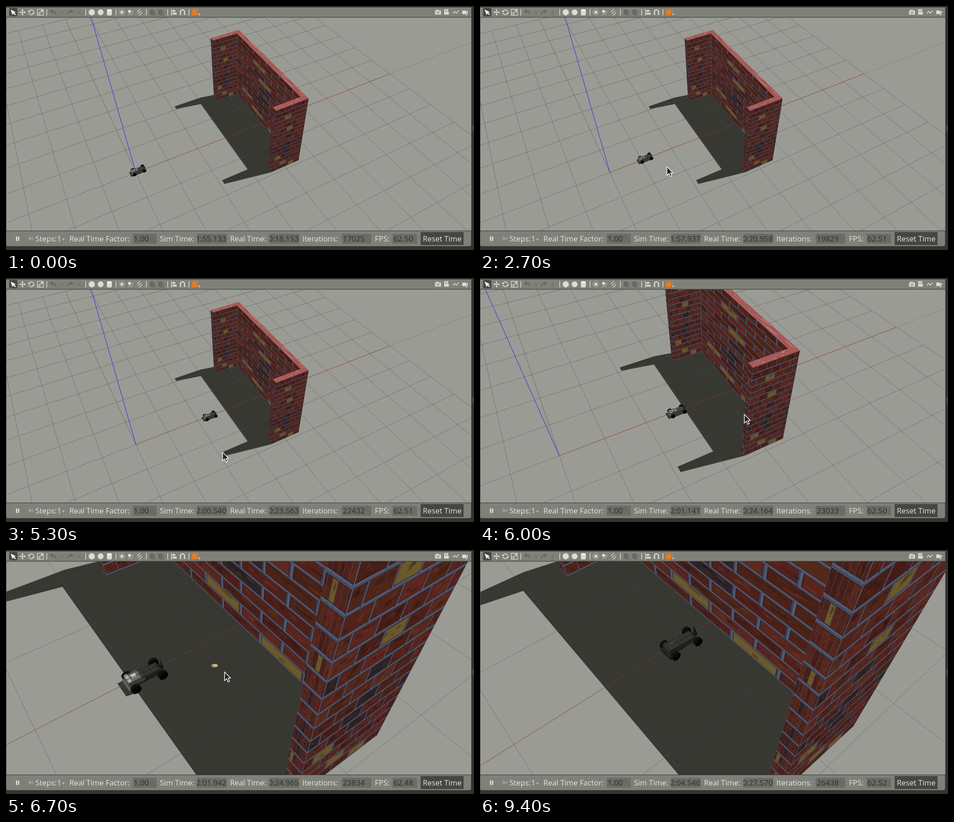
An HTML page with a canvas for the animation above (9500 ms loop, 1034 by 542 pixels).

```html
<!DOCTYPE html>
<html lang="en">
<head>
<meta charset="utf-8">
<title>Robot approaching a wall</title>
<style>
html, body { margin: 0; width: 100%; height: 100%; overflow: hidden; background: #34342f; }
canvas { display: block; }
</style>
</head>
<body>
<canvas id="stage" width="1034" height="542"></canvas>
<script>
const g = document.getElementById('stage').getContext('2d');
const LOOP = 9500, STEP = 100, FOCAL = 890, TURN = Math.PI * 2;

const mix = (a, b, k) => a + (b - a) * k;
const progress = (t, from, to) => Math.min(1, Math.max(0, (t - from) / (to - from)));
const range = (n, f) => Array.from({ length: n }, (_, i) => f(i));

let seed = 7;
function rnd() {
  seed = (seed * 1664525 + 1013904223) % 4294967296;
  return seed / 4294967296;
}

// ---------- drawing helpers ----------
function trace(points) {
  points.forEach((p, i) => i ? g.lineTo(p[0], p[1]) : g.moveTo(p[0], p[1]));
}
function poly(points, fill) {
  g.beginPath();
  trace(points);
  g.closePath();
  g.fillStyle = fill;
  g.fill();
}
function stroke(points, color, width = 1.5) {
  g.beginPath();
  trace(points);
  g.strokeStyle = color;
  g.lineWidth = width;
  g.stroke();
}
function rect(x, y, w, h, fill) {
  g.fillStyle = fill;
  g.fillRect(x, y, w, h);
}
function ellipse(x, y, rx, ry, fill) {
  g.beginPath();
  g.ellipse(x, y, rx, ry, 0, 0, TURN);
  g.fillStyle = fill;
  g.fill();
}
function arc(x, y, r, a, b, color, width = 2) {
  g.beginPath();
  g.arc(x, y, r, a, b);
  g.strokeStyle = color;
  g.lineWidth = width;
  g.stroke();
}
function panel(x, y, w, h, r, fill) {
  g.beginPath();
  g.roundRect(x, y, w, h, r);
  g.fillStyle = fill;
  g.fill();
}
function clipped(x, y, w, h, paint) {
  g.save();
  g.beginPath();
  g.rect(x, y, w, h);
  g.clip();
  paint();
  g.restore();
}
const around = (x, y, r, n, from = 0) => range(n, i => {
  const a = from + i * TURN / n;
  return [x + r * Math.cos(a), y + r * Math.sin(a)];
});
const tri = (x, y, r, angle, fill) => poly(around(x, y, r, 3, angle), fill);

// ---------- camera ----------
const PIVOT = [3.77, -0.336];
let cam;
// Zooms in on the pivot, then orbits around it.
function setCamera(t) {
  const dist = 12.98 * Math.pow(0.324, progress(t, 5800, 6580));
  const turn = progress(t, 6500, 6815);
  const pitch = mix(44.7, 53.7, turn) * TURN / 360, yaw = mix(61.5, 49.3, turn) * TURN / 360;
  const [s, c, sy, cy] = [Math.sin(pitch), Math.cos(pitch), Math.sin(yaw), Math.cos(yaw)];
  const right = 0.078 * dist - 0.578, up = 0.219 - 0.0466 * dist;
  const ahead = dist * c + up * s;
  cam = {
    s, c, sy, cy,
    x: PIVOT[0] - ahead * cy - right * sy,
    y: PIVOT[1] - ahead * sy + right * cy,
    h: dist * s - up * c
  };
}
function view([x, y, z]) {
  const dx = x - cam.x, dy = y - cam.y, dz = z - cam.h;
  const ahead = dx * cam.cy + dy * cam.sy;
  return [dx * cam.sy - dy * cam.cy, ahead * cam.s + dz * cam.c, ahead * cam.c - dz * cam.s];
}
const screen = ([r, u, d]) => [514 + FOCAL * r / d, 262 - FOCAL * u / d];
const project = p => screen(view(p));
const poly3 = (points, fill) => poly(points.map(project), fill);

function line3(a, b, color, width = 1) {
  const near = 0.05;
  let p = view(a), q = view(b);
  if (p[2] < near && q[2] < near) return;
  const cut = (from, to) => from.map((v, i) => mix(v, to[i], (near - from[2]) / (to[2] - from[2])));
  if (p[2] < near) p = cut(p, q);
  else if (q[2] < near) q = cut(q, p);
  stroke([screen(p), screen(q)], color, width);
}

// ---------- ground ----------
const FRONT = 3.5, INNER = 4.35, BACK = 4.5, IN_Y = 1.75, OUT_Y = 1.9, TOP = 2.5;

function shadow(x0, x1, y0, y1, h) {
  const a = h * 0.5556, b = h * 0.1111;
  const pts = [[x0, y0], [x1, y0], [x1, y1], [x1 - a, y1 + b], [x0 - a, y1 + b], [x0 - a, y0 + b]];
  trace(pts.map(([x, y]) => project([x, y, 0])));
  g.closePath();
}
function ground(rx, ry) {
  rect(0, 25, 1028, 475, '#9a9b95');
  g.beginPath();
  shadow(INNER, BACK, -OUT_Y, OUT_Y, TOP);
  shadow(FRONT, BACK, -OUT_Y, -IN_Y, TOP);
  shadow(FRONT, BACK, IN_Y, OUT_Y, TOP);
  shadow(rx - 0.2, rx + 0.2, ry - 0.1, ry + 0.1, 0.11);
  g.fillStyle = '#373832';
  g.fill();
  for (let i = -10; i <= 10; i++) {
    line3([i, -10, 0], [i, 10, 0], 'rgba(74,80,75,.5)');
    line3([-10, i, 0], [10, i, 0], 'rgba(74,80,75,.5)');
  }
  line3([0, 0, 0], [0, 10, 0], 'rgba(60,145,80,.4)');
  line3([0, 0, 0], [10, 0, 0], 'rgba(190,25,52,.52)');
  line3([10, 0, 0], [20, 0, 0], 'rgba(205,70,75,.5)');
  line3([0, 0, 0], [0, 0, 6], '#3a31d8', 1.1);
}

// ---------- brick walls ----------
const ROWS = 16, COLS = 5;
const YELLOW = ['2,2', '5,2', '12,1', '14,2', '15,3'];

function brickColor(id) {
  const tone = rnd();
  if (YELLOW.includes(id)) return '#69592b';
  if (rnd() < 0.1) return '#2d2325';
  return `hsl(${6 + 7 * tone}, 51%, ${18 + 6 * rnd()}%)`;
}
const blotch = () => ({
  u: rnd() * 0.75, v: rnd() * 0.7, w: 0.1 + rnd() * 0.25, h: 0.1 + rnd() * 0.25,
  fill: rnd() < 0.55 ? 'rgba(25,14,14,.25)' : 'rgba(140,74,44,.2)'
});
const bricks = range(ROWS * (COLS + 1), i => {
  const row = Math.floor(i / (COLS + 1)), col = i % (COLS + 1), shift = row % 2 ? 0 : 0.5;
  return {
    u: Math.max(0, (col - shift) / COLS), end: Math.min(1, (col + 1 - shift) / COLS),
    v: row / ROWS, fill: brickColor(row + ',' + col), spots: range(5, blotch)
  };
}).filter(b => b.u < 1);

// Hangs the brick pattern from a top left corner along a horizontal vector.
function brickFace(x, y, dx, dy) {
  const at = (u, v) => project([x + dx * u, y + dy * u, TOP * (1 - v)]);
  const quad = (u, v, w, h, fill) => poly([at(u, v), at(u + w, v), at(u + w, v + h), at(u, v + h)], fill);
  quad(0, 0, 1, 1, '#3a3e52');
  for (const b of bricks) {
    const w = b.end - b.u, h = 1 / ROWS;
    quad(b.u, b.v + 0.002, w - 0.008, h - 0.002, '#505b73');
    quad(b.u + 0.008, b.v + 0.004, w - 0.014, h - 0.01, '#351c1b');
    const u = b.u + 0.011, v = b.v + 0.006, bw = w - 0.019, bh = h - 0.014;
    quad(u, v, bw, bh, b.fill);
    for (const s of b.spots) quad(u + s.u * bw, v + s.v * bh, s.w * bw, s.h * bh, s.fill);
  }
}
const STREAKS = ['rgba(226,178,172,.5)', 'rgba(130,48,48,.55)', 'rgba(160,140,160,.4)'];
const streaks = range(46, i => ({
  u: rnd() * 0.9, v: rnd() * 0.9, w: 0.03 + rnd() * 0.07, h: 0.05 + rnd() * 0.05, fill: STREAKS[i % 3]
}));
function topFace(x0, x1, y0, y1) {
  const slab = (u, v, w, h, fill) => poly3([[u, v], [u + w, v], [u + w, v + h], [u, v + h]]
    .map(([a, b]) => [mix(x0, x1, a), mix(y0, y1, b), TOP]), fill);
  slab(0, 0, 1, 1, '#a85956');
  for (const s of streaks) slab(s.u, s.v, s.w, s.h, s.fill);
}
function walls() {
  brickFace(INNER, IN_Y, 0, -2 * IN_Y);
  brickFace(FRONT, IN_Y, INNER - FRONT, 0);
  brickFace(FRONT, OUT_Y, 0, IN_Y - OUT_Y);
  topFace(FRONT, INNER, IN_Y, OUT_Y);
  topFace(INNER, BACK, -OUT_Y, OUT_Y);
  brickFace(FRONT, -OUT_Y, BACK - FRONT, 0);
  brickFace(FRONT, -IN_Y, 0, IN_Y - OUT_Y);
  topFace(FRONT, INNER, -OUT_Y, -IN_Y);
}

// ---------- robot ----------
const gray = l => `hsl(60, 3%, ${l}%)`;

function robot(rx, ry) {
  // Centred box standing at height z; parts outside the wall's shadow are brighter.
  const box = (x, len, wide, z, h, shade, sunny) => {
    const l = rx + x < 3.04 ? sunny : shade;
    const x0 = rx + x - len / 2, x1 = x0 + len, y0 = ry - wide / 2, y1 = y0 + wide, top = z + h;
    poly3([[x0, y0, z], [x0, y1, z], [x0, y1, top], [x0, y0, top]], gray(l * 0.7));
    poly3([[x0, y0, z], [x1, y0, z], [x1, y0, top], [x0, y0, top]], gray(l * 0.55));
    poly3([[x0, y0, top], [x1, y0, top], [x1, y1, top], [x0, y1, top]], gray(l));
  };
  const wheel = (x, y) => {
    for (let w = 0.02; w > -0.025; w -= 0.01) {
      poly3(around(rx + x, 0.05, 0.05, 20).map(([a, z]) => [a, ry + y + w, z]), w > -0.015 ? '#11110f' : '#040404');
    }
  };
  const wheels = y => [-0.15, 0.15].forEach(x => wheel(x, y));

  wheels(0.1);
  box(-0.01, 0.4, 0.11, 0.03, 0.02, 15, 32);
  box(-0.2, 0.03, 0.17, 0.02, 0.03, 14, 38);
  box(0.15, 0.04, 0.18, 0.035, 0.025, 14, 28);
  box(0.04, 0.22, 0.11, 0.06, 0.035, 20, 34);
  box(-0.11, 0.17, 0.12, 0.06, 0.06, 21, 40);
  box(-0.17, 0.03, 0.12, 0.12, 0.01, 20, 68);
  box(-0.11, 0.05, 0.05, 0.12, 0.01, 24, 74);
  box(-0.04, 0.025, 0.14, 0.12, 0.02, 22, 72);
  for (const y of [-0.055, 0, 0.055]) line3([rx - 0.19, ry + y, 0.12], [rx + 0.17, ry + y, 0.09], '#1d1d1b');
  for (const x of [0, 0.07, 0.14]) line3([rx + x, ry - 0.055, 0.095], [rx + x, ry + 0.055, 0.095], '#1d1d1b');
  box(0.19, 0.03, 0.04, 0.05, 0.04, 13, 13);
  poly3(around(0.015, 0.09, 0.042, 18).map(([y, z]) => [rx + 0.2 + y / 4, ry + y, z]), '#161614');
  wheels(-0.1);
}

function marker() {
  const [x, y] = project([...PIVOT, 0]);
  ellipse(x, y, 7.5, 4.5, '#6d603c');
  ellipse(x, y - 0.8, 7, 3.3, '#b7a672');
  ellipse(x + 2, y - 1, 3.5, 1.8, '#d3c79b');
}

// ---------- pointer ----------
const ARROW = [[1, 1], [1, 20], [5.4, 16], [8.6, 23], [11.8, 21.6], [8.8, 15], [14, 14.4]];
const arrow = (x, y, k = 1) => ARROW.map(p => [x + p[0] * k, y + p[1] * k]);

function pointer(t) {
  const glide = (from, a, to, b) => {
    const k = progress(t, from, to);
    return [mix(a[0], b[0], k), mix(a[1], b[1], k)];
  };
  const near = [412, 356], wall = [583, 302], drag = [482, 270];
  let at;
  if (t >= 900 && t < 3500) at = glide(900, [978, 480], 2600, near);
  else if (t >= 3500 && t < 4000) at = glide(3500, near, 4000, [424, 545]);
  else if (t >= 4900 && t < 6100) at = glide(4900, [372, 470], 5700, wall);
  else if (t >= 6100 && t < 6800) at = glide(6100, wall, 6500, drag);
  else if (t >= 6800 && t < 8400) at = [491, 277];
  if (!at) return;
  const pts = arrow(...at);
  poly(pts, '#20211f');
  stroke([...pts, pts[0], pts[1]], '#f4f4f2', 1.5);
}

// ---------- interface ----------
const LIGHT = '#dcdcd7', DIM = '#62635e', BAR = '#7f807a', EDGE = '#33332e', PRESSED = '#464742';
const DOWN = TURN / 4;

function toolbar() {
  rect(0, 0, 1034, 3, EDGE);
  rect(0, 3, 1028, 22, BAR);
  rect(0, 24.5, 1028, 1.2, '#3d3e39');
  for (const x of [90, 176, 243, 310, 357, 404]) rect(x - 0.5, 7, 1.5, 14, LIGHT);

  // select, move, rotate, scale
  panel(7, 4, 18, 19, 3, PRESSED);
  g.save();
  g.translate(10, 7);
  g.rotate(-0.35);
  poly(arrow(-1, 0, 0.7), '#f0f0ec');
  g.restore();
  stroke([[31, 14], [42, 14]], LIGHT);
  stroke([[36.5, 8.5], [36.5, 19.5]], LIGHT);
  around(36.5, 14, 5, 4).forEach(([x, y], i) => tri(x, y, 2.6, i * DOWN, LIGHT));
  for (const a of [0.3, 0.3 + TURN / 2]) {
    arc(56, 14, 5.4, a, a + 2.5, LIGHT, 1.7);
    tri(56 + 5.4 * Math.cos(a), 14 + 5.4 * Math.sin(a), 3, a - DOWN, LIGHT);
  }
  g.lineWidth = 1.3;
  g.strokeStyle = LIGHT;
  g.strokeRect(69.5, 7.5, 13, 13);
  g.strokeRect(69.5, 15.5, 5, 5);
  stroke([[74, 16], [80, 10]], LIGHT);
  tri(79.5, 10.5, 3.2, -DOWN / 2, LIGHT);

  // undo, redo
  for (const [x, k] of [[104, 1], [141, -1]]) {
    stroke([[x - 4 * k, 12], [x + 2 * k, 12], [x + 5.5 * k, 15], [x + 5 * k, 19]], DIM, 2);
    tri(x - 3 * k, 12, 4.5, k > 0 ? TURN / 2 : 0, DIM);
    tri(x + 19.5, 14.5, 2.6, DOWN, DIM);
  }

  // box, sphere, cylinder
  poly(around(189.5, 14, 7.5, 6, TURN / 12), LIGHT);
  ellipse(209, 14, 6.5, 6.5, LIGHT);
  rect(223, 9, 11, 10, LIGHT);
  ellipse(228.5, 19, 5.5, 2, LIGHT);
  ellipse(228.5, 9, 5.5, 2, '#f0f0ec');

  // lights
  ellipse(256, 14, 3.2, 3.2, LIGHT);
  const inner = around(256, 14, 4.5, 8), outer = around(256, 14, 7, 8);
  inner.forEach((p, i) => stroke([p, outer[i]], LIGHT, 1.3));
  ellipse(273, 12, 3.6, 3.6, LIGHT);
  around(273, 12, 7, 10, -0.1).slice(0, 4).forEach(([x, y]) => ellipse(x, y, 1, 1, LIGHT));
  for (const k of [0, 4, 8]) stroke([[289 + k * 0.6, 13 + k], [296 + k * 0.6, 7 + k]], LIGHT, 1.4);

  // copy, paste, align, snap, view
  for (const x of [318, 337]) {
    rect(x, 8, 8, 11, DIM);
    rect(x + 3, 11, 8, 10, '#6a6b66');
  }
  rect(365, 7, 1.7, 14, LIGHT);
  rect(368, 9, 6, 4, LIGHT);
  rect(368, 15, 9, 4, LIGHT);
  arc(390, 13, 4.5, TURN / 2, 0, LIGHT, 2.6);
  for (const x of [384.2, 393.2]) rect(x, 13, 2.6, 7, LIGHT);
  rect(411, 9, 11, 11, '#ec7a1c');
  stroke([[414, 8], [425, 8], [425, 17]], '#b7865a', 1.3);
  tri(427, 18.5, 2.6, DOWN, LIGHT);

  // camera, log, plot, video
  rect(948, 10, 13, 9, LIGHT);
  rect(951, 8, 5, 3, LIGHT);
  arc(954.5, 14.5, 2.4, 0, TURN, BAR, 1.3);
  rect(968, 7, 9, 12, LIGHT);
  for (const y of [9.5, 12]) rect(969.5, y, 6, 1, BAR);
  tri(976.5, 16.5, 3.8, DOWN, LIGHT);
  stroke([[987, 17], [991, 12], [995, 16], [1000, 10]], LIGHT, 1.6);
  rect(1008, 10, 8, 8, LIGHT);
  tri(1018, 14, 4, TURN / 2, LIGHT);
  tri(1017, 19, 2.6, DOWN, LIGHT);
}

const FONT = 'px "Open Sans", "Noto Sans", sans-serif';
function label(s, x, color = '#e6e6e1', size = 16.7) {
  g.font = size + FONT;
  g.fillStyle = color;
  g.fillText(s, x, 523);
}
function field(s, x, w, alignRight) {
  rect(x, 506, w, 22, '#6b6c66');
  clipped(x, 506, w, 22, () => {
    g.textAlign = alignRight ? 'right' : 'left';
    label(s, alignRight ? x + w - 1 : x + 2, '#2c2d29', 17);
  });
}
function clock(ms) {
  const pad = (n, l) => String(n).padStart(l, '0');
  return pad(Math.floor(ms / 60000), 2) + ':' + pad(Math.floor(ms / 1000) % 60, 2) + '.' + pad(ms % 1000, 3);
}
function statusBar(t) {
  const updates = Math.floor((t + 100) / 200);
  const sim = Math.round(updates * 200.27), real = Math.round(updates * 200.36);
  const fps = 62.5 + 0.024 * Math.sin(0.0034 * updates * updates);

  rect(0, 499, 1034, 43, '#34342f');
  panel(0.5, 500, 1027, 33.5, [0, 0, 4, 4], BAR);
  for (const x of [22, 26.6]) rect(x, 512, 2.6, 10, '#e6e6e1');
  for (const x of [50, 58]) rect(x, 512, 1.7, 9, '#a3a49e');
  tri(54.5, 516.5, 4, 0, '#a3a49e');

  label('Steps:', 65);
  clipped(114, 506, 7, 22, () => label('1', 113));
  tri(127, 518, 3, DOWN, '#c4c4bf');
  label('Real Time Factor:', 140);
  field('1.00', 280, 53);
  label('Sim Time:', 340);
  field(clock(115133 + sim), 422, 66, true);
  label('Real Time:', 495);
  field('00:' + clock(18153 + real), 582, 66, true);
  label('Iterations:', 655);
  field(String(17025 + sim), 742, 65);
  label('FPS:', 815);
  field(fps.toFixed(2), 854, 54);
  rect(916, 502, 95, 29, PRESSED);
  label('Reset Time', 921);
}

function draw(t) {
  setCamera(t);
  const rx = 0.09 + 3.787 * progress(t, 600, 8250), ry = -0.02 * rx;
  clipped(0, 25, 1028, 475, () => {
    ground(rx, ry);
    walls();
    robot(rx, ry);
    if (t >= 6500 && t < 6900) marker();
  });
  rect(0, 25, 1, 475, '#4b4c47');
  toolbar();
  statusBar(t);
  rect(1028, 0, 6, 542, EDGE);
  rect(1031, 265, 2, 13, '#55564f');
  pointer(t);
}

let shown = -1;
function tick(now) {
  const t = Math.floor((now % LOOP) / STEP) * STEP;
  if (t !== shown) draw(shown = t);
  requestAnimationFrame(tick);
}
draw(0);
requestAnimationFrame(tick);
</script>
</body>
</html>
```
